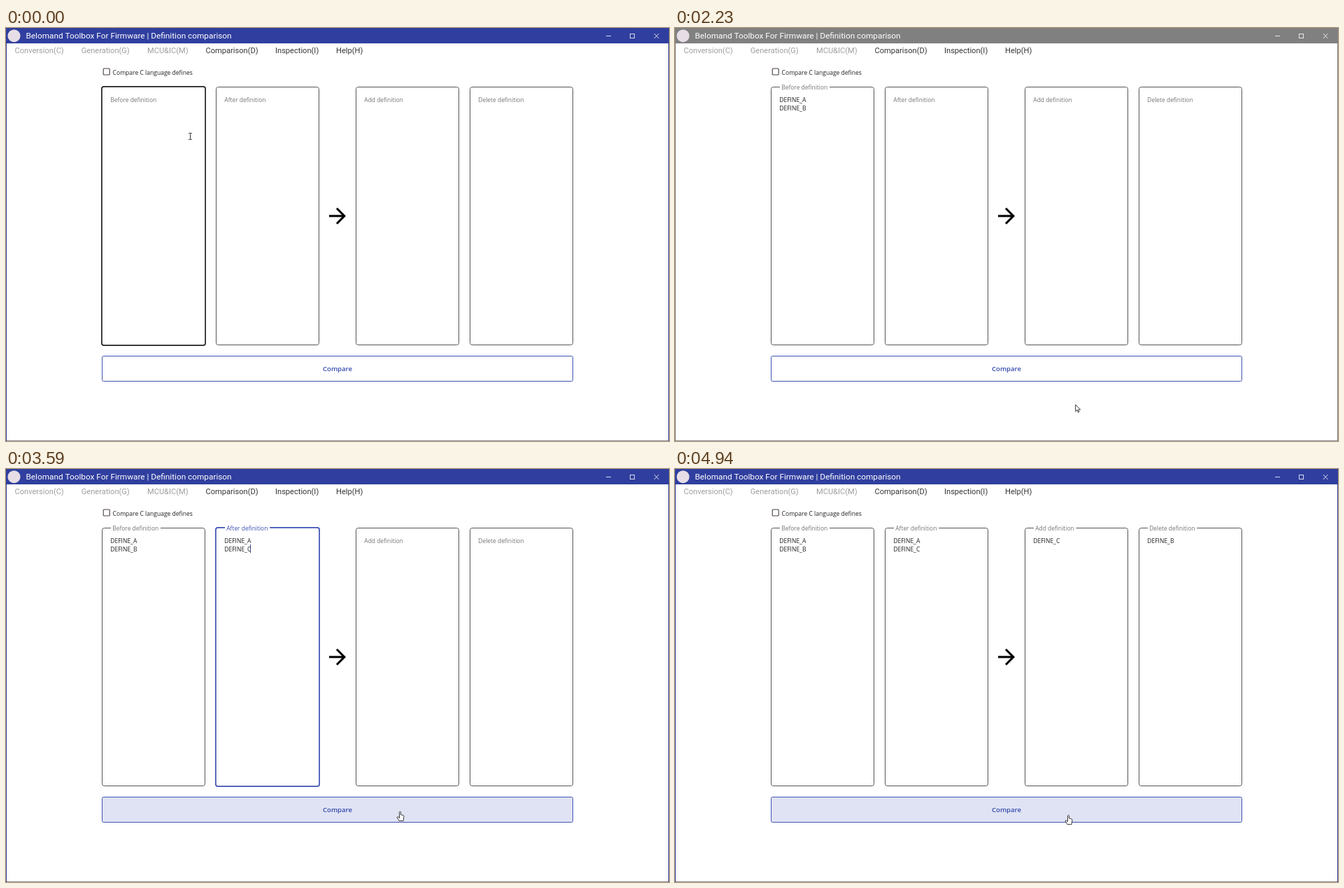
An HTML page with a canvas for the animation above (5.07 s loop, 948 by 591 pixels).

```html
<!DOCTYPE html>
<html lang="en">
<head>
<meta charset="utf-8">
<title>Definition comparison</title>
<style>
html, body { margin: 0; width: 100%; height: 100%; overflow: hidden; background: #fff; }
canvas { display: block; width: 948px; height: 591px; }
</style>
</head>
<body>
<canvas id="stage" width="948" height="591"></canvas>
<script>
const ctx = document.getElementById('stage').getContext('2d');
const LOOP = 5070, STEP = 67;
const BLUE = '#3f51b5', TITLE = '#303f9f', GREY = '#757575', INK = '#212121';
const UI = '"Open Sans", "Noto Sans", sans-serif';
const ROBOTO = 'Roboto, sans-serif';
const FIELD_FONT = '8.45px ' + UI;

const SHAPES = {
  arrow: new Path2D('M0 0V9.7L2.3 7.6 3.8 11 5.2 10.4 3.8 7.1H6.9Z'),
  hand: new Path2D('M-1 .8Q0-.8 1 .8V4.6L4.4 5.6Q5.6 6 5.5 7.4L4.5 13.5H-1.5L-4.4 8.6Q-4.2 7.3-3 7.8L-1 9.6Z'),
  next: new Path2D('M12 4l-1.41 1.41L16.17 11H4v2h12.17l-5.58 5.59L12 20l8-8z')
};

const clamp = v => Math.max(0, Math.min(1, v));
const ease = v => v * v * (3 - 2 * v);
const between = (t, a, b) => t >= a && t < b;
const mix = (a, b, k) => a + (b - a) * k;
const fade = (t, start, length) => ease(clamp((t - start + STEP) / length));

function text(str, x, y, font, color, align = 'left') {
  ctx.font = font;
  ctx.fillStyle = color;
  ctx.textAlign = align;
  ctx.fillText(str, x, y);
}

function line(color, width, ...points) {
  ctx.strokeStyle = color;
  ctx.lineWidth = width;
  ctx.beginPath();
  points.forEach(([x, y], i) => i ? ctx.lineTo(x, y) : ctx.moveTo(x, y));
  ctx.stroke();
}

function roundBox(x, y, w, h, r, color, width) {
  ctx.strokeStyle = color;
  ctx.lineWidth = width;
  ctx.beginPath();
  ctx.roundRect(x, y, w, h, r);
  ctx.stroke();
}

function drawWindow(active) {
  const frame = active ? TITLE : '#808080';
  ctx.fillStyle = '#fff';
  ctx.fillRect(0, 0, 948, 591);
  ctx.fillStyle = '#8f8f98';
  ctx.fillRect(0, 590, 948, 1);
  ctx.fillStyle = frame;
  ctx.fillRect(0, 0, 1, 591);
  ctx.fillRect(947, 0, 1, 591);
  ctx.fillRect(0, 0, 948, 22);
  ctx.fillStyle = '#e6dde6';
  ctx.beginPath();
  ctx.arc(11.5, 11.2, 9, 0, 7);
  ctx.fill();
  text('Belomand Toolbox For Firmware | Definition comparison', 28.5, 15.2, '11.8px ' + ROBOTO, '#fff');
  const control = 'rgba(255,255,255,.8)';
  line(control, 1, [858, 11.5], [865, 11.5]);
  ctx.strokeRect(892.5, 8.5, 6, 6);
  line(control, 1, [926.8, 8], [933.5, 15]);
  line(control, 1, [933.5, 8], [926.8, 15]);

  [['Conversion(C)', 12.5], ['Generation(G)', 107.7], ['MCU&IC(M)', 202],
   ['Comparison(D)', 285.5], ['Inspection(I)', 385], ['Help(H)', 472]
  ].forEach(([name, x], i) => text(name, x, 35.8, '11.1px ' + ROBOTO, i < 3 ? '#9e9e9e' : '#353535'));

  roundBox(139.2, 58, 9, 9, 1, '#4b3c46', 1.1);
  text('Compare C language defines', 152.6, 67, '8.55px ' + UI, INK);

  ctx.save();
  ctx.translate(456, 251);
  ctx.scale(1.5, 1.5);
  ctx.fillStyle = '#000';
  ctx.fill(SHAPES.next);
  ctx.restore();
}

// lift: 0 = label rests inside the box, 1 = label sits in the top border
function drawField({ x, label, lift, lines, focus, caret, dark }) {
  const color = dark ? INK : focus ? BLUE : '#555';
  if (focus || dark) roundBox(x - 0.1, 83.9, 148.2, 370.2, 3.2, color, 1.7);
  else roundBox(x + 0.5, 84.5, 147, 369, 3, color, 1);

  ctx.font = FIELD_FONT;
  if (lift > 0) {
    const notch = (ctx.measureText(label).width + 5) * clamp(lift * 2);
    ctx.fillStyle = '#fff';
    ctx.fillRect(x + 13, 82, notch, 4);
  }
  text(label, x + mix(12.3, 15.2, lift), mix(106, 88.2, lift), FIELD_FONT, focus && !dark ? BLUE : GREY);
  lines.forEach((s, i) => text(s, x + 12.3, 106 + i * 12, '8.5px ' + UI, INK));
  if (caret) {
    const row = Math.max(0, lines.length - 1);
    ctx.fillStyle = lines.length ? '#3b4780' : '#9aa0d0';
    ctx.fillRect(x + (lines.length ? 49 : 12), 96 + row * 12, 1, 12);
  }
}

function drawButton(t) {
  const disabled = between(t, 3860, 4730);
  const hover = t < 3860 ? fade(t, 3400, 200)
    : t < 4730 ? 1 - fade(t, 3860, 250)
    : fade(t, 4730, 250);
  ctx.fillStyle = `rgba(63,81,181,${0.16 * hover})`;
  ctx.fillRect(138, 470, 672, 35);
  const border = disabled ? '#c5c8e8' : BLUE;
  roundBox(137.5, 469.5, 673, 36, 2, border, 1);
  text(disabled ? 'Complete.' : 'Compare', 474, 491.4, '600 9.6px ' + UI,
    disabled ? '#bfc2e6' : '#354aae', 'center');
}

// Stops: [time, x, y]; the pointer advances in fixed steps between them.
const ROUTES = [
  { end: 570, stops: [[0, 263, 155], [210, 263, 155], [500, 704, 565]] },
  { start: 2230, stops: [[2230, 572.7, 539], [2565, 404, 258], [3060, 404, 258],
    [3250, 523, 385], [3460, 563.5, 490], [3790, 563.5, 490],
    [3870, 561, 494], [4720, 561, 494], [4800, 562.5, 495.2]] }
];

function pointerAt(t) {
  const route = ROUTES.find(r => between(t, r.start ?? 0, r.end ?? LOOP));
  if (!route) return null;
  const { stops } = route;
  const i = stops.findLastIndex(s => t >= s[0]);
  const a = stops[i], b = stops[i + 1];
  if (!b) return [a[1], a[2]];
  const span = b[0] - a[0];
  const k = clamp(Math.floor((t - a[0]) / STEP) * STEP / span);
  return [mix(a[1], b[1], k), mix(a[2], b[2], k)];
}

function drawPointer(t) {
  const p = pointerAt(t);
  if (!p) return;
  const [x, y] = p;
  const inField = y > 84 && y < 454 &&
    [137, 300, 500, 663].some(left => x > left && x < left + 148);
  const onButton = y > 469 && y < 506 && !between(t, 3860, 4730);
  if (inField) {
    const c = Math.round(x) + 0.5, m = Math.round(y);
    line('#333', 1, [c, m - 4.5], [c, m + 4.5]);
    for (const end of [m - 4.5, m + 4.5]) line('#555', 1, [c - 2.5, end], [c + 2.5, end]);
    return;
  }
  const shape = SHAPES[onButton ? 'hand' : 'arrow'];
  ctx.save();
  ctx.translate(x, y);
  ctx.fillStyle = '#fff';
  ctx.strokeStyle = '#222';
  ctx.lineWidth = 0.9;
  ctx.lineJoin = 'round';
  ctx.fill(shape);
  ctx.stroke(shape);
  ctx.restore();
}

function draw(t) {
  const results = t >= 3860;
  const resultLift = fade(t, 3860, 200) * results;
  drawWindow(!between(t, 1440, 2650));
  drawField({
    x: 137, label: 'Before definition',
    lift: t < 70 ? 0 : fade(t, 70, 200),
    lines: t >= 640 ? ['DEFINE_A', 'DEFINE_B'] : [],
    focus: t < 1440, dark: t < 70, caret: between(t, 70, 1170)
  });
  drawField({
    x: 300, label: 'After definition',
    lift: t < 2650 ? 0 : fade(t, 2650, 200),
    lines: t >= 3120 ? ['DEFINE_A', 'DEFINE_C'] : [],
    focus: between(t, 2650, 3670), dark: between(t, 2650, 2720), caret: between(t, 2720, 3670)
  });
  drawField({ x: 500, label: 'Add definition', lift: resultLift, lines: results ? ['DEFINE_C'] : [] });
  drawField({ x: 663, label: 'Delete definition', lift: resultLift, lines: results ? ['DEFINE_B'] : [] });
  drawButton(t);
  drawPointer(t);
}

const began = performance.now();
function tick() {
  draw((performance.now() - began) % LOOP);
  requestAnimationFrame(tick);
}
tick();
</script>
</body>
</html>
```
